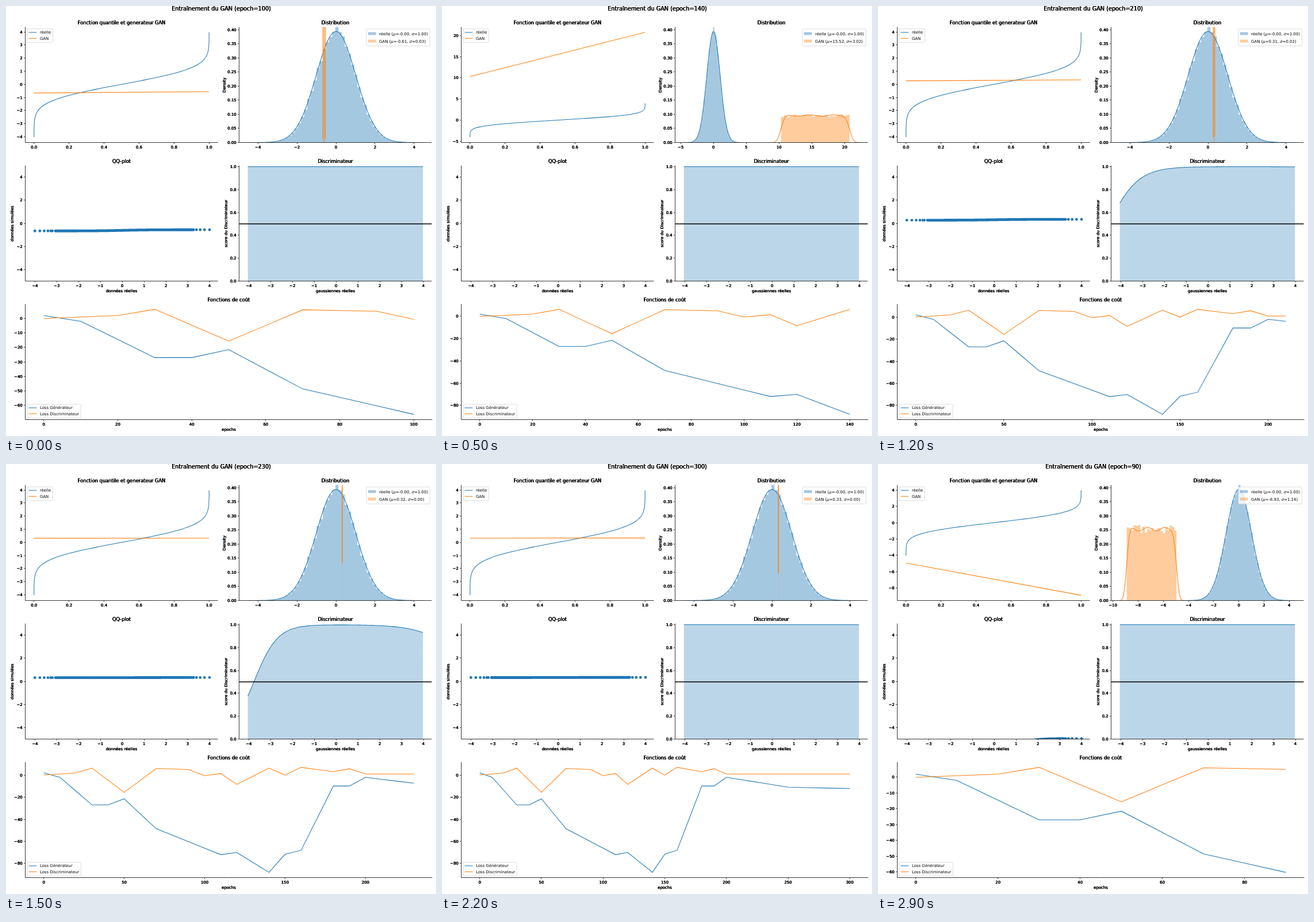
An HTML page with a canvas for the animation above (3000 ms loop, 748 by 748 pixels).

```html
<!DOCTYPE html>
<html lang="fr">
<head>
<meta charset="utf-8">
<title>Entraînement du GAN</title>
<style>
html, body { margin: 0; width: 100%; height: 100%; overflow: hidden; background: #fff; }
canvas { display: block; width: 748px; height: 748px; }
</style>
</head>
<body>
<canvas id="stage" width="748" height="748"></canvas>
<script>
const ctx = document.getElementById('stage').getContext('2d');
const BLUE = '#1f77b4', ORANGE = '#ff7f0e', FONT = '"DejaVu Sans", sans-serif';
const SMALL = 6.93, TITLE = 8.31;
const Z_MIN = -4.04, Z_MAX = 3.98, REAL_BW = 0.158;

// Key points: [epoch, value, ...]
const lossG = [[0, 2], [10, -2], [30, -27], [40, -27], [50, -21.5], [70, -48.6], [110, -72], [120, -70],
  [140, -88], [150, -71.6], [160, -68], [180, -9.9], [190, -9.9], [200, -2], [250, -11], [300, -12.2]];
const lossD = [[0, 0], [20, 2], [30, 6.3], [50, -15.6], [70, 6], [90, 5], [100, -0.6], [110, 1.4], [120, -8.5],
  [140, 6.3], [150, 0], [160, 7], [180, 3], [190, 5.7], [200, 1]];
// Generator output: mean, slope
const generator = [[30, -5, -3], [50, -10.92, -5.92], [90, -6.93, -3.95], [100, -0.61, 0.1],
  [140, 15.52, 10.46], [180, 3.04, 2.64], [200, 0.3, 0.1], [230, 0.32, 0.01], [300, 0.33, 0.014]];
// Discriminator score: logit at the left end, logit at the right end
const scoreEnds = [[160, 12, 12], [180, 2.67, 12], [230, -0.51, 2.59], [260, 12, 12]];

function valuesAt(keys, epoch) {
  const i = keys.findIndex(k => k[0] >= epoch);
  const b = keys.at(i), a = keys[Math.max(0, i - 1)];
  const t = i > 0 ? (epoch - a[0]) / (b[0] - a[0]) : 1;
  return b.slice(1).map((v, j) => a[j + 1] + (v - a[j + 1]) * t);
}
const range = (n, f) => Array.from({ length: n }, (_, i) => f(i));
const span = (a, b, n) => range(n + 1, i => a + (b - a) * i / n);
const noise = i => { const s = Math.sin(i * 12.9898 + 4.1) * 43758.5453; return (s - Math.floor(s)) * 2 - 1; };
const sigmoid = x => 1 / (1 + Math.exp(-x));
const normal = (x, s = 1) => Math.exp(-x * x / (2 * s * s)) / (s * Math.sqrt(2 * Math.PI));
function cdf(z) {
  const x = Math.abs(z) / Math.SQRT2, t = 1 / (1 + 0.3275911 * x);
  const tail = t * (0.254829592 + t * (-0.284496736 + t * (1.421413741 + t * (-1.453152027 + t * 1.061405429)))) * Math.exp(-x * x) / 2;
  return z < 0 ? tail : 1 - tail;
}

const realBin = (Z_MAX - Z_MIN) / 50;
const realBars = range(50, i => normal(Z_MIN + (i + 0.5) * realBin) * (1 + 0.04 * noise(i)));
const realKde = span(Z_MIN - 3 * REAL_BW, Z_MAX + 3 * REAL_BW, 160).map(x => [x, normal(x, 1.0125)]);
const quantile = span(Z_MIN, Z_MAX, 240).map(z => [cdf(z), z]);
const outliers = range(6, i => 3.2 + 0.8 * (i / 5) ** 1.5);
const scatter = [...span(-3.06, 3.24, 220), ...outliers, ...outliers.map(z => -z)];

// Several slightly spread passes give the heavier axis lettering
function text(str, x, y, { size = SMALL, align = 'center', spread = [-0.25, 0, 0.25], style = '' } = {}) {
  ctx.font = `${style} ${size}px ${FONT}`;
  ctx.textAlign = align;
  ctx.fillStyle = '#000';
  spread.forEach(dx => ctx.fillText(str, x + dx, y));
}
const legendText = (str, x, y, style) => text(str, x, y, { align: 'left', spread: [0], style });
function vertical(str, x, y) {
  ctx.save();
  ctx.translate(x, y);
  ctx.rotate(-Math.PI / 2);
  text(str, 0, 2.5);
  ctx.restore();
}
function stroke(points, color, width = 1.05) {
  ctx.beginPath();
  points.forEach(p => ctx.lineTo(p[0], p[1]));
  ctx.strokeStyle = color;
  ctx.lineWidth = width;
  ctx.stroke();
}
function fill(color, alpha) {
  ctx.globalAlpha = alpha;
  ctx.fillStyle = color;
  ctx.fill();
  ctx.globalAlpha = 1;
}

function pad(lo, hi) {
  const m = (hi - lo) * 0.05;
  return [lo - m, hi + m];
}
function autoTicks([lo, hi]) {
  const raw = (hi - lo) / 9, mag = 10 ** Math.floor(Math.log10(raw));
  const step = [1, 2, 2.5, 5, 10].find(s => s * mag >= raw) * mag;
  return { step, digits: step === 2.5 ? 1 : 0 };
}

// Axes with box [left, top, right, bottom] and data limits
function axes([l, t, r, b], xlim, ylim, title) {
  const X = x => l + (x - xlim[0]) / (xlim[1] - xlim[0]) * (r - l);
  const Y = y => b - (y - ylim[0]) / (ylim[1] - ylim[0]) * (b - t);
  return {
    X, Y,
    line: (pts, color, width) => stroke(pts.map(([x, y]) => [X(x), Y(y)]), color, width),
    bars(start, width, heights, color) {
      ctx.beginPath();
      heights.forEach((h, i) => ctx.rect(X(start + i * width), Y(h), X(width) - X(0), b - Y(h)));
      fill(color, 0.4);
    },
    clip(drawInside) {
      ctx.save();
      ctx.beginPath();
      ctx.rect(l, t, r - l, b - t + 0.5);
      ctx.clip();
      drawInside();
      ctx.restore();
    },
    frame(xt = autoTicks(xlim), yt = autoTicks(ylim)) {
      const each = ([lo, hi], { step, digits }, f) => {
        for (let i = Math.ceil(lo / step - 1e-6); i * step <= hi + 1e-6; i++)
          f(i * step, (i * step).toFixed(digits).replace('-', '\u2212'));
      };
      stroke([[l, t], [l, b], [r, b]], '#222', 0.9);
      each(xlim, xt, (v, label) => {
        const x = Math.round(X(v));
        stroke([[x, b], [x, b + 2.5]], '#222', 0.8);
        text(label, X(v), b + 10.2);
      });
      each(ylim, yt, (v, label) => {
        const y = Math.round(Y(v));
        stroke([[l - 2.5, y], [l, y]], '#222', 0.8);
        text(label, l - 4.8, Y(v) + 2.5, { align: 'right' });
      });
      text(title, (l + r) / 2, t - 4.2, { size: TITLE });
    }
  };
}

function legendBox(x, y, w, h) {
  ctx.beginPath();
  ctx.roundRect(x, y, w, h, 1.5);
  fill('#fff', 0.8);
  ctx.strokeStyle = 'rgba(204,204,204,.8)';
  ctx.lineWidth = 0.8;
  ctx.stroke();
}
function lineLegend(x, y, w, names) {
  legendBox(x, y, w, 24);
  names.forEach((name, i) => {
    const cy = y + 6.2 + i * 10.4;
    stroke([[x + 2.8, cy], [x + 16.6, cy]], i ? ORANGE : BLUE);
    legendText(name, x + 22.2, cy + 2.4);
  });
}
function densityLegend(rows) {
  legendBox(626.4, 39.5, 110.6, 29.5);
  rows.forEach(([name, mean, sd], i) => {
    const cy = 47.5 + i * 13;
    ctx.beginPath();
    ctx.rect(629.2, cy - 2.5, 13.8, 5);
    fill(i ? ORANGE : BLUE, 0.4);
    let x = 648.6;
    for (const part of [name + ' (', 'μ', `=${mean}, `, 'σ', `=${sd})`]) {
      legendText(part, x, cy + 2.5, part.length === 1 ? 'italic' : '');
      x += ctx.measureText(part).width;
    }
  });
}

function draw(epoch) {
  const [mean, slope] = valuesAt(generator, epoch);
  const width = Math.abs(slope), lo = mean - width / 2, hi = mean + width / 2;
  const sd = width / Math.sqrt(12), bw = REAL_BW * sd;
  const realLim = pad(Z_MIN, Z_MAX);
  const qLim = pad(Math.min(Z_MIN, lo), Math.max(Z_MAX, hi));
  // Long tick labels push both columns one pixel right
  const shift = qLim[0] < -10 && autoTicks(qLim).digits ? 1 : 0;
  const left = 33 + shift, mid = 405 + shift;
  const unit = { step: 1, digits: 0 }, fifths = { step: 0.2, digits: 1 };

  ctx.resetTransform();
  ctx.fillStyle = '#fff';
  ctx.fillRect(0, 0, 748, 748);
  ctx.translate(0.5, 0.5);
  text(`Entraînement du GAN (epoch=${epoch})`, 374, 7.5, { size: 9.7 });

  const q = axes([left, 36, 368, 237], pad(0, 1), qLim, 'Fonction quantile et generateur GAN');
  q.line(quantile, BLUE);
  q.line([[0, mean - slope / 2], [1, mean + slope / 2]], ORANGE);
  q.frame(fifths);
  lineLegend(left + 3.2, 39.2, 44.5, ['réelle', 'GAN']);

  const dLim = pad(Math.min(realKde[0][0], lo - 3 * bw), Math.max(realKde.at(-1)[0], hi + 3 * bw));
  const d = axes([mid, 36, 740, 237], dLim, [0, 0.41], 'Distribution');
  const ganKde = span(lo - 3 * bw, hi + 3 * bw, 200).map(x =>
    [x, (cdf((x - lo) / bw) - cdf((x - hi) / bw)) / width * (1 + 0.025 * Math.cos((x - lo) / width * 18 + 5))]);
  d.clip(() => {
    d.bars(Z_MIN, realBin, realBars, BLUE);
    d.line(realKde, BLUE);
    d.bars(lo, width / 22, range(22, i => (1 + 0.06 * noise(i + epoch)) / width), ORANGE);
    d.line(ganKde, ORANGE);
  });
  d.frame(undefined, { step: 0.05, digits: 2 });
  vertical('Density', 378.5, 137);
  densityLegend([['réelle', '-0.00', '1.00'], ['GAN', mean.toFixed(2), sd.toFixed(2)]]);

  const qq = axes([left, 277, 368, 478], realLim, [-5, 5], 'QQ-plot');
  qq.clip(() => {
    ctx.beginPath();
    for (const z of scatter) {
      const x = qq.X(z), y = qq.Y(lo + width * cdf(z));
      ctx.moveTo(x + 2.4, y);
      ctx.arc(x, y, 2.4, 0, 7);
    }
    fill(BLUE, 1);
  });
  qq.frame(unit, { step: 2, digits: 0 });
  text('données réelles', (left + 368) / 2, 497.8);
  vertical('données simulées', left - 23, 378);

  const s = axes([mid, 277, 740, 478], realLim, [0, 1.01], 'Discriminateur');
  const [logitL, logitR] = valuesAt(scoreEnds, epoch);
  const steep = 0.9 + 0.95 * Math.min(1, Math.max(0, (epoch - 180) / 50));
  const score = span(Z_MIN, Z_MAX, 120).map(x =>
    [x, sigmoid(logitL + steep * (x - Z_MIN)) * sigmoid(logitR + 1.1 * (Z_MAX - x))]);
  ctx.beginPath();
  [[Z_MIN, 0], ...score, [Z_MAX, 0]].forEach(([x, y]) => ctx.lineTo(s.X(x), s.Y(y)));
  fill(BLUE, 0.3);
  s.line(score, BLUE);
  s.line(realLim.map(x => [x, 0.5]), '#000', 1.3);
  s.frame(unit, fifths);
  text('gaussiennes réelles', (mid + 740) / 2, 497.8);
  vertical('score du Discriminateur', 382, 378);

  const curves = [lossG, lossD].map(keys => range(epoch / 10 + 1, i => [i * 10, valuesAt(keys, i * 10)[0]]));
  const values = curves.flat().map(p => p[1]);
  const loss = axes([left, 518, 741, 719], pad(0, epoch), pad(Math.min(...values), Math.max(...values)), 'Fonctions de coût');
  curves.forEach((pts, i) => loss.line(pts, i ? ORANGE : BLUE));
  loss.frame();
  text('epochs', (left + 741) / 2, 738.8);
  const atRight = epoch >= 40 && epoch <= 60;
  lineLegend(atRight ? 643.3 : left + 3.2, epoch <= 60 ? 521.3 : 692.3, 93.5, ['Loss Générateur', 'Loss Discriminateur']);
}

// 28 plots (epochs 30 to 300) spread over 30 ticks of 100 ms, starting at epoch 100
const start = performance.now();
let shown = 0;
function tick(now) {
  const step = (Math.floor(Math.max(0, now - start) / 100) + 7) % 30;
  const epoch = 30 + 10 * Math.round(step * 27 / 29);
  if (epoch !== shown) draw(shown = epoch);
  requestAnimationFrame(tick);
}
tick(start);
</script>
</body>
</html>
```
